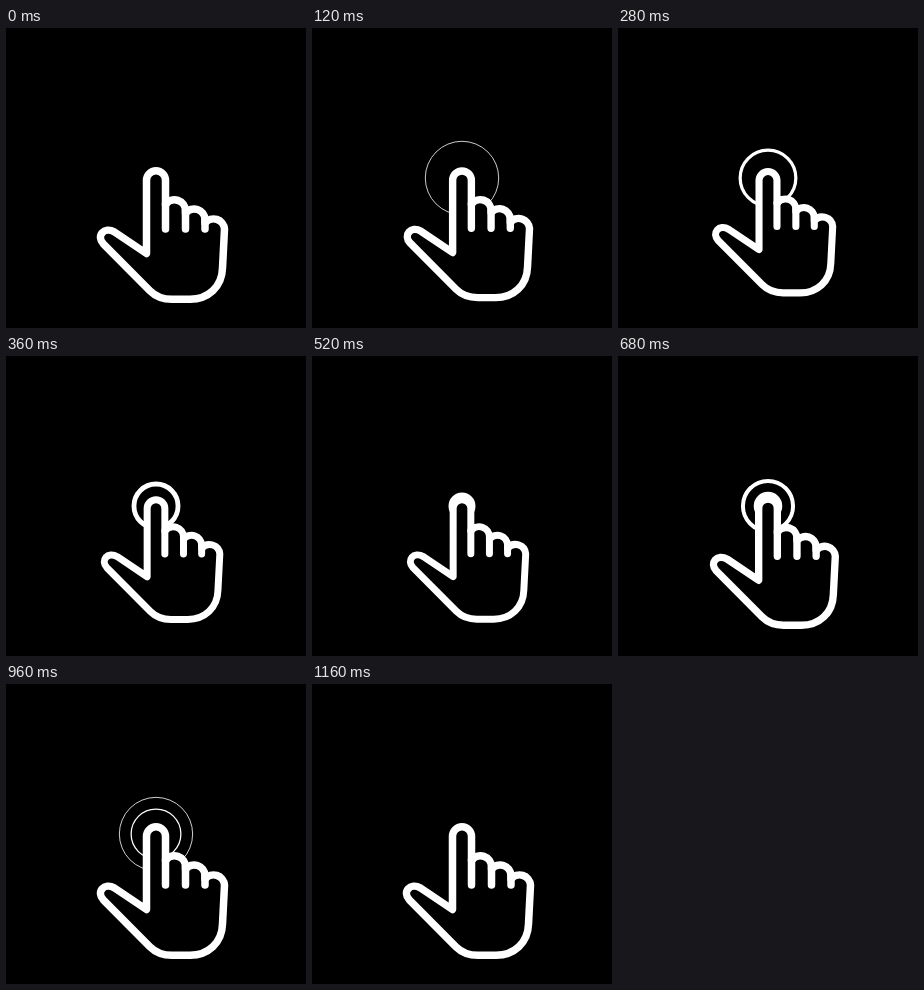
Recreate the animation shown at these times as an HTML page. Size 300x300 px, loop 2.24 s.

```html
<!DOCTYPE html>
<html lang="en">
<head>
<meta charset="utf-8">
<title>Tap</title>
<style>
  html, body { margin: 0; width: 100%; height: 100%; overflow: hidden; background: #000; }
  svg { display: block; width: 100vw; height: 100vh; }
  .ring { fill: none; stroke: #fff; }
  .hand { fill: #000; stroke: #fff; stroke-width: 7.5; stroke-linecap: round; stroke-linejoin: round; }
</style>
</head>
<body>
<svg viewBox="0 0 300 300">
  <circle class="ring" id="outer" cx="150" cy="150"/>
  <circle class="ring" id="inner" cx="150" cy="150"/>
  <g class="hand" id="hand">
    <path d="M140.5 225.5V152.3a9.5 9.5 0 0 1 19 0V176.5
      A11 11 0 0 1 179.5 183V185
      A11 11 0 0 1 199 191.5V195
      A11 11 0 0 1 218.5 201
      L216.5 240C216 259 202 271.3 184 271.3H166
      C157 271.3 150 268.8 144 262.8L97.3 215.8
      C90 208 98 198 108.5 204Z"/>
    <path d="M159.5 176V201M179.5 183V201M199 191.5V201"/>
  </g>
</svg>
<script>
  const LOOP = 2240, STEP = 40;
  const PIVOT_X = 150, PIVOT_Y = 156;
  const PRESSED = 0.93, SMALL = 13.5;
  const outer = document.getElementById('outer');
  const inner = document.getElementById('inner');
  const hand = document.getElementById('hand');

  const progress = (t, from, to) => Math.min(1, Math.max(0, (t - from) / (to - from)));
  const easeOut = (p, power) => 1 - (1 - p) ** power;
  const easeInOut = p => (1 - Math.cos(Math.PI * p)) / 2;

  // spread: 0 = tight and thick, 1 = wide and thin
  function setRing(ring, visible, spread, wide) {
    const edge = SMALL + (wide - SMALL) * spread;
    const width = 0.8 + 7.5 * (1 - spread);
    ring.setAttribute('visibility', visible ? 'visible' : 'hidden');
    ring.setAttribute('r', edge - width / 2);
    ring.setAttribute('stroke-width', width);
  }

  function draw(t) {
    const press = easeInOut(progress(t, 0, 400)) - easeOut(progress(t, 520, 840), 2);
    const scale = 1 - (1 - PRESSED) * press;
    hand.setAttribute('transform',
      `translate(${PIVOT_X} ${PIVOT_Y}) scale(${scale}) translate(${-PIVOT_X} ${-PIVOT_Y})`);

    const spread = t < 520
      ? 1 - progress(t, 130, 520) ** 1.18
      : easeOut(progress(t, 520, 980), 2);
    setRing(outer, t >= 120 && t < 1000, spread, 37.1);
    setRing(inner, t >= 680 && t < 1160, easeOut(progress(t, 670, 1150), 3), 26.3);
  }

  const start = performance.now();
  function tick() {
    const t = (performance.now() - start) % LOOP;
    draw(Math.floor(t / STEP) * STEP);
    requestAnimationFrame(tick);
  }
  tick();
</script>
</body>
</html>
```
